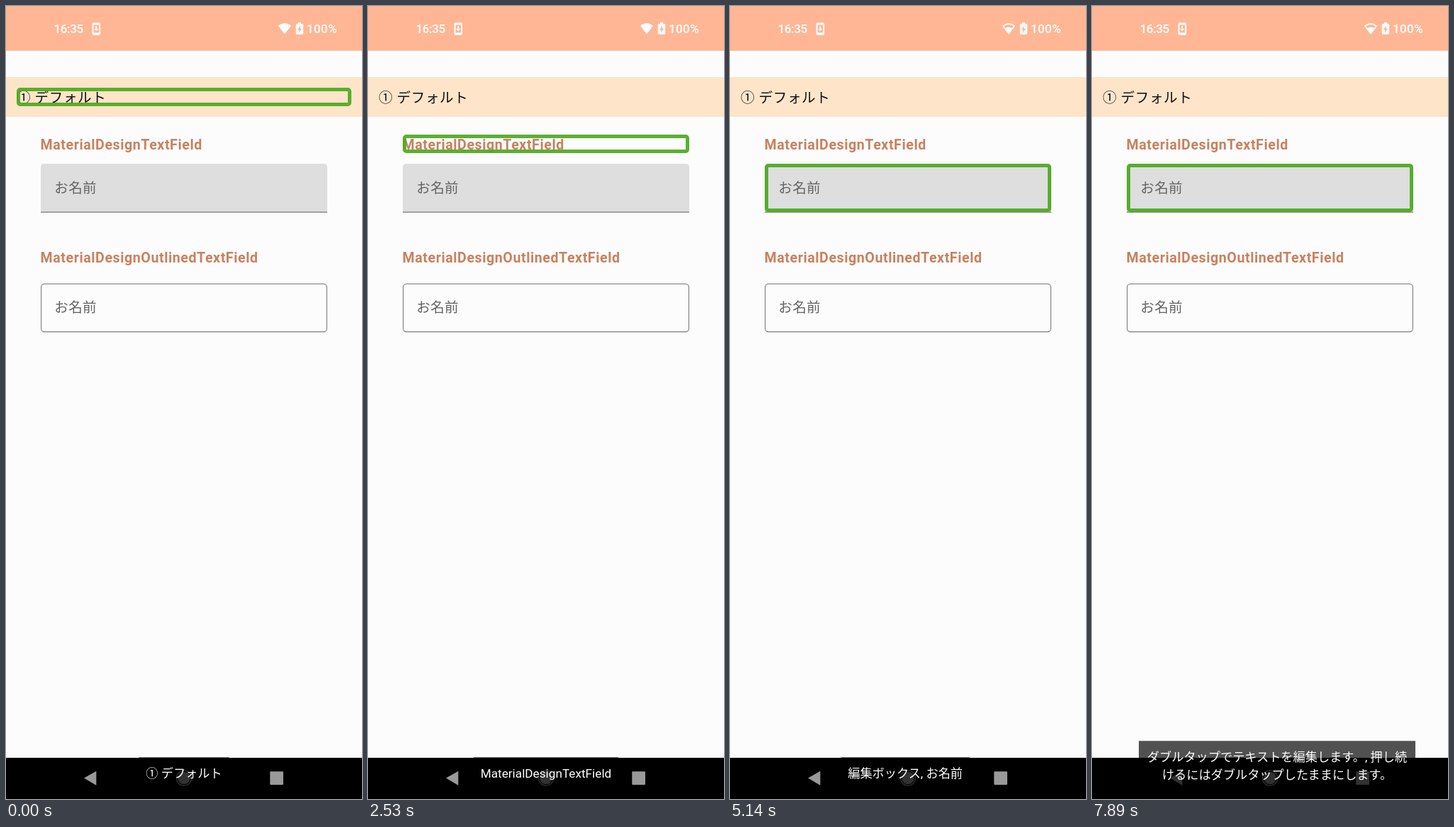
An HTML page that plays this animation: 502 by 1116 pixels, repeating every 7990 ms.

```html
<!DOCTYPE html>
<html lang="ja">
<head>
<meta charset="utf-8">
<title>Text field focus</title>
<style>
html, body { margin: 0; width: 100%; height: 100%; overflow: hidden; background: #fcfcfc; }
svg { display: block; width: 100%; height: 100%; }
text { font-family: Roboto, "Noto Sans CJK JP", "Noto Sans CJK", sans-serif; white-space: pre; }
.body { font-size: 19.54px; letter-spacing: .61px; fill: #111; }
.head { font-weight: 700; fill: #c9805f; }
.hint { letter-spacing: .3px; fill: #646464; }
.status { font-size: 17px; font-weight: 500; fill: #fff; }
#toast text { font-size: 17.2px; fill: #fff; text-anchor: middle; }
</style>
</head>
<body>
<svg viewBox="0 0 502 1116">
  <rect width="502" height="1116" fill="#fcfcfc"/>

  <rect width="502" height="63" fill="#ffb695"/>
  <text class="status" x="67.5" y="38" letter-spacing="-.4">16:35</text>
  <g fill="#fff">
    <rect x="121.5" y="23.5" width="11.5" height="17.5" rx="2"/>
    <path d="M123.5 26.5h7.5v11h-7.5z" fill="#ffb695"/>
    <path d="M126.4 28h1.7v4h2.2l-3.05 3.6-3.05-3.6h2.2z"/>
    <path id="wifiFull" d="M393 39.5L384 28Q393 20.5 402 28Z"/>
    <g id="wifiWeak">
      <path d="M393 38.6L385 28.2Q393 22 401 28.2Z" fill="none" stroke="#fff" stroke-width="1.6"/>
      <path d="M393 39.5L387.3 32Q393 27.5 398.7 32Z"/>
    </g>
    <path d="M412 23h4v2h1.8q1.4 0 1.4 1.4v12.2q0 1.4-1.4 1.4h-7.6q-1.4 0-1.4-1.4V26.4q0-1.4 1.4-1.4h1.8z"/>
    <path d="M414.8 27.5v4.2h2.2l-3.8 6.3v-4.5H411z" fill="#ffb695"/>
  </g>
  <text class="status" x="424" y="38" letter-spacing=".4">100%</text>

  <rect y="100" width="502" height="56" fill="#fee5c9"/>
  <text class="body" x="15" y="136">① デフォルト</text>

  <text class="body head" x="48.5" y="202">MaterialDesignTextField</text>
  <path d="M49 290.5V227q0-5 5-5H448q5 0 5 5V290.5z" fill="#dedede"/>
  <path d="M49 290.2H453" stroke="#7c7c7c" stroke-width="1.3"/>
  <text class="body hint" x="68.3" y="263">お名前</text>

  <text class="body head" x="48.5" y="360.5">MaterialDesignOutlinedTextField</text>
  <rect x="49.6" y="391.2" width="402.8" height="67.3" rx="4.5" fill="none" stroke="#8a8a8a" stroke-width="1.3"/>
  <text class="body hint" x="68.3" y="431">お名前</text>

  <rect id="focus" rx="2.5" fill="none" stroke="#4baa1e" stroke-width="5" opacity=".92"/>
  <circle id="touch" r="13.6" fill="#fff" fill-opacity=".4" stroke="#d3d3f4" stroke-width="2"/>

  <rect y="1058" width="502" height="58" fill="#000"/>
  <g fill="#999">
    <path d="M110 1086.5L127.3 1076.8V1096.8z"/>
    <circle cx="251" cy="1086.5" r="8.7"/>
    <circle cx="251" cy="1086.5" r="10.6" fill="none" stroke="#999" stroke-width="1.2"/>
    <rect x="372.3" y="1077.3" width="18.7" height="18.7" rx="1"/>
  </g>

  <g id="toast">
    <rect fill="#000" fill-opacity=".68"/>
    <text y="29"></text>
    <text y="54"></text>
  </g>
</svg>
<script>
const LOOP = 7990, MID = 251, LINE = 25.4, SLIDE = 814;
const $ = id => document.getElementById(id);
const set = (el, attrs) => { for (const k in attrs) el.setAttribute(k, attrs[k]); };
const clamp = v => Math.max(0, Math.min(1, v));
const lerp = (a, b, u) => a + (b - a) * u;
const easeOut = u => 1 - (1 - u) ** 3;
const easeInOut = u => u < .5 ? 4 * u ** 3 : 1 - 4 * (1 - u) ** 3;
const latest = (list, t) => list.filter(s => s.at <= t).pop();

// Outer bounds of the focus frame.
const focuses = [
  { at: 0, x: 15, y: 115, w: 472, h: 26 },
  { at: 2210, x: 49, y: 181, w: 404, h: 26 },
  { at: 4800, x: 49, y: 222, w: 404, h: 68 }
];

const swipes = [
  { at: 1450, dur: 650, x: 193, y: 862 },
  { at: 4160, dur: 560, x: 205, y: 861 }
];

// A toast replacing another one slides from the old corner to its own.
const toasts = [
  { at: 0, w: 127, lines: ["① デフォルト"] },
  { at: 1220, w: 0, lines: [] },
  { at: 2250, w: 204, lines: ["MaterialDesignTextField"], fade: 260 },
  { at: 4900, w: 182, lines: ["編集ボックス, お名前"], from: 204 },
  { at: 7450, w: 390, lines: ["ダブルタップでテキストを編集します。, 押し続", "けるにはダブルタップしたままにします。"], from: 182 }
];

function drawFocus(t) {
  const f = latest(focuses, t);
  set($("focus"), { x: f.x + 2.5, y: f.y + 2.5, width: f.w - 5, height: f.h - 5 });
}

function drawTouch(t) {
  const s = swipes.find(s => t >= s.at && t < s.at + s.dur + 60);
  set($("touch"), { visibility: s ? "visible" : "hidden" });
  if (!s) return;
  const u = easeInOut(clamp((t - s.at) / s.dur));
  set($("touch"), {
    cx: lerp(s.x, 400, u), cy: lerp(s.y, 850, u),
    opacity: 1 - clamp((t - s.at - s.dur) / 60)
  });
}

function drawToast(t) {
  const s = latest(toasts, t), age = t - s.at;
  const [box, ...rows] = $("toast").children;
  const extra = Math.max(0, s.lines.length - 1) * LINE;
  const u = s.from ? easeOut(clamp(age / SLIDE)) : 1;
  const x = MID - lerp(s.from || s.w, s.w, u) / 2;
  const y = 1057.2 - extra * u;
  set($("toast"), {
    transform: `translate(${x} ${y})`,
    opacity: s.fade ? clamp(age / s.fade) : 1
  });
  set(box, { width: s.w, height: s.lines.length ? 45 + extra : 0 });
  rows.forEach((row, i) => {
    const line = s.lines[i] || "";
    if (row.textContent !== line) row.textContent = line;
    set(row, { x: s.w / 2 });
  });
}

function draw(t) {
  set($("wifiFull"), { visibility: t < 3910 ? "visible" : "hidden" });
  set($("wifiWeak"), { visibility: t < 3910 ? "hidden" : "visible" });
  drawFocus(t);
  drawTouch(t);
  drawToast(t);
}

const start = performance.now();
function tick() {
  draw((performance.now() - start) % LOOP);
  requestAnimationFrame(tick);
}
tick();
</script>
</body>
</html>
```
